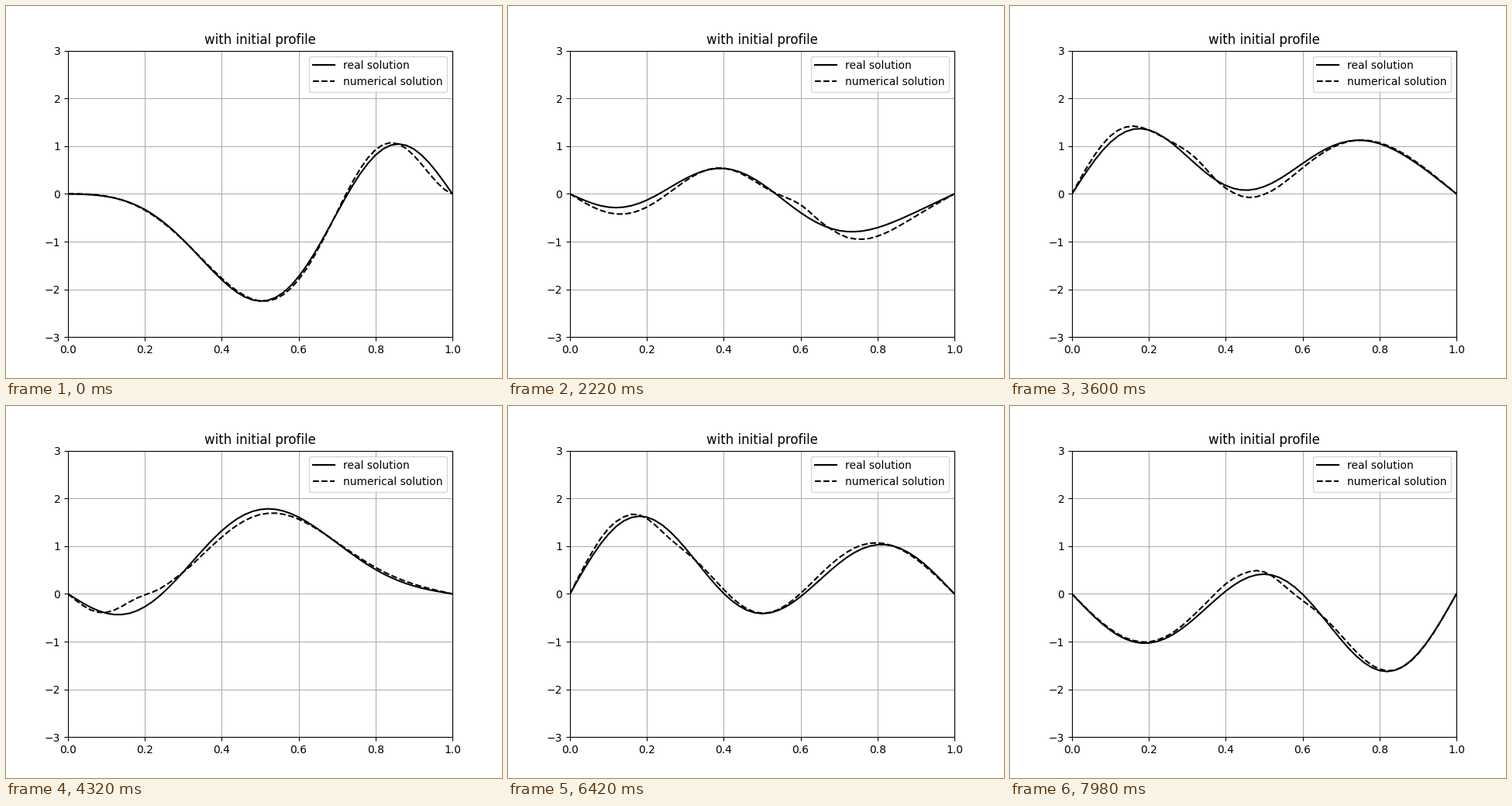
Animation, 640 px wide and 480 px high, one loop 8000 ms. Source, as a matplotlib script:

```python
import numpy as np
import matplotlib.pyplot as plt
from matplotlib.animation import FuncAnimation

TICK = 20          # ms per drawn frame
HOLD = 3           # drawn frames per time step
LOOP = 8000        # ms
CELLS = 50
DT = 0.0125
MODES = np.arange(1, 5)
STEPS = LOOP // (TICK * HOLD) + 1


def profile(x):
    return -9 * x * (1 - x) * np.sin(6 * x**2)


def sine_coefficients():
    s = np.linspace(0, 1, 2001)
    waves = np.sin(np.pi * np.outer(MODES, s))
    return 2 * (waves * profile(s)).sum(axis=1) * (s[1] - s[0])


def leapfrog(x):
    """Finite differences for u_tt = u_xx with fixed ends, starting at rest."""
    r2 = (DT / (x[1] - x[0])) ** 2

    def bend(u):
        out = np.zeros_like(u)
        out[1:-1] = r2 * (u[2:] - 2 * u[1:-1] + u[:-2])
        return out

    u = profile(x)
    rows = [u, u, u + bend(u) / 2]
    while len(rows) < STEPS:
        rows.append(2 * rows[-1] - rows[-2] + bend(rows[-1]))
    return rows


x = np.linspace(0, 1, CELLS + 1)
coef = sine_coefficients()
shapes = np.sin(np.pi * np.outer(MODES, x))
numeric = leapfrog(x)


def series(t):
    return (coef * np.cos(np.pi * MODES * t)) @ shapes


fig, ax = plt.subplots(figsize=(6.4, 4.8), dpi=100)
real_line, = ax.plot(x, series(0), "k-", label="real solution")
num_line, = ax.plot(x, numeric[0], "k--", label="numerical solution")
ax.set_xlim(0, 1)
ax.set_ylim(-3, 3)
ax.set_title("with initial profile")
ax.grid(True)
ax.legend(loc="upper right")


def update(i):
    k = i // HOLD
    real_line.set_ydata(series(k * DT))
    num_line.set_ydata(numeric[k])
    return real_line, num_line


anim = FuncAnimation(fig, update, frames=LOOP // TICK, interval=TICK,
                     repeat=True, repeat_delay=0)
plt.show()
```
